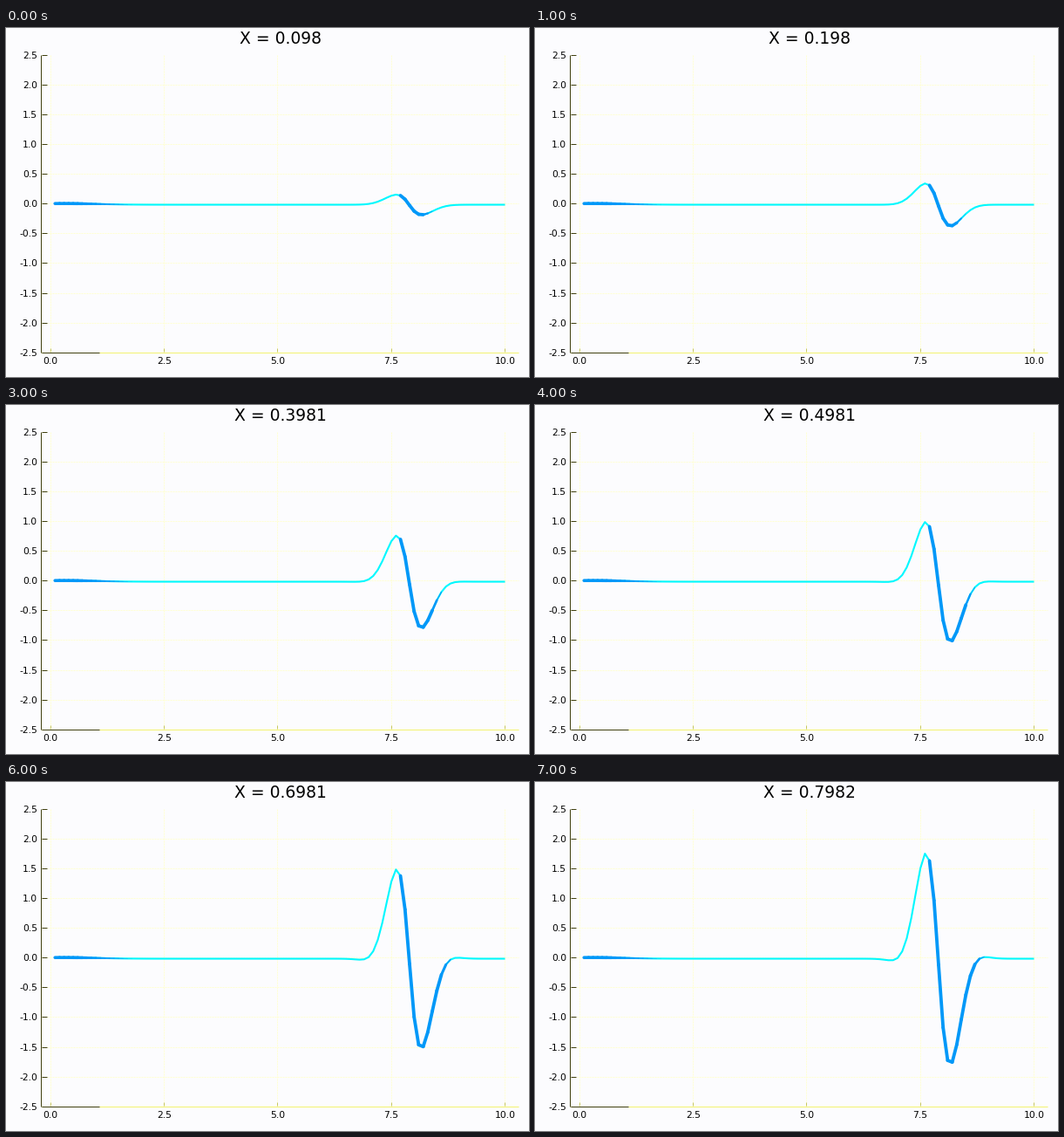
A matplotlib script for the animation above (8000 ms loop, 600 by 400 pixels).

```python
import numpy as np
import matplotlib
import matplotlib.pyplot as plt
from matplotlib.animation import FuncAnimation
from matplotlib.collections import LineCollection

matplotlib.rcParams["font.family"] = "DejaVu Sans"

W, H, DPI = 600, 400, 100
FRAMES = 8
PT = 72 / DPI  # points per pixel
CYAN, BLUE = "#00f8ff", "#0098f8"
GRID, AXIS, BASE = "#ffffd2", "#404010", "#f2f270"
CENTER = 7.89  # where the wave crosses zero
X = np.linspace(0.1, 10, 100)


def px(x):
    return 51 + 52.15 * np.asarray(x)


def py(y):
    return 201.3 - 68.16 * np.asarray(y)


def amount(i):
    return 0.09802 + 0.10002 * i


def wave(i):
    """Odd pulse that grows and gains side dips as the amount rises."""
    a = amount(i)
    u = X - CENTER
    r = np.abs(u)
    pulse = -1.35 * np.tanh(u / 0.21) * np.exp(-3.8 * r ** 2.5)
    dips = 0.12 * np.sign(u) * np.exp(-((r - 0.62) / 0.38) ** 2)
    start = 0.02 * np.exp(-((X - 0.3) / 1.0) ** 2)
    grow = a * (1.64 + 0.88 * a)
    return start - 0.018 + grow * (pulse + dips * i / (FRAMES - 1))


def heavy_width(x, i):
    """Pixel width of the blue stroke: tapers at the start and after the fall."""
    start = 3.6 * np.clip((1.8 - x) / 1.2, 0, 1)
    end = 8.4 + 0.075 * i
    fall = 3.8 * np.clip((end - x) / 0.25, 0, 1) * (x > 7.7)
    return start + fall


fig = plt.figure(figsize=(W / DPI, H / DPI), dpi=DPI, facecolor="#fcfcfe")
ax = fig.add_axes([0, 0, 1, 1])
ax.set_xlim(0, W)
ax.set_ylim(H, 0)
ax.axis("off")


def stroke(xs, ys, color, width=1, **kw):
    return ax.plot(xs, ys, color=color, lw=width * PT,
                   solid_capstyle="butt", **kw)[0]


def label(x, y, text, size=10.75, ha="center"):
    return ax.text(x, y, text, size=size * PT, ha=ha, va="baseline")


# Grid, ticks and labels
for v in np.arange(-2.5, 2.6, 0.5):
    y = py(v)
    if abs(v) < 2.5:
        stroke([41, 588], [y, y], GRID, zorder=0, dashes=(2, 1))
    stroke([41, 47], [y, y], AXIS)
    label(36, y + 4, f"{v:.1f}", ha="right")

for v in np.arange(0, 10.1, 2.5):
    x = px(v) - 0.4
    stroke([x, x], [31, 371], GRID, zorder=0, dashes=(2, 1))
    stroke([x, x], [367, 371], "#c8c860")
    label(px(v), 385, f"{v:.1f}")

stroke([40, 40], [31, 372], AXIS)
stroke([41, 588], [371.5, 371.5], BASE)
stroke([41, 107], [371.5, 371.5], AXIS)

title = label(314.7, 18, "", size=18.8)
light = stroke([], [], CYAN, 2.1, zorder=3)
heavy = LineCollection([], colors=BLUE, capstyle="round", zorder=4)
ax.add_collection(heavy, autolim=False)


def draw(i):
    pts = np.column_stack([px(X), py(wave(i))])
    title.set_text(f"X = {amount(i):.4f}".rstrip("0"))
    light.set_data(*pts.T)

    mid = (X[:-1] + X[1:]) / 2
    width = heavy_width(mid, i)
    on = width > 0
    heavy.set_segments(np.stack([pts[:-1], pts[1:]], axis=1)[on])
    heavy.set_linewidth(width[on] * PT)
    return title, light, heavy


anim = FuncAnimation(fig, draw, frames=FRAMES, interval=1000, repeat=True,
                     repeat_delay=0, blit=False)
plt.show()
```
